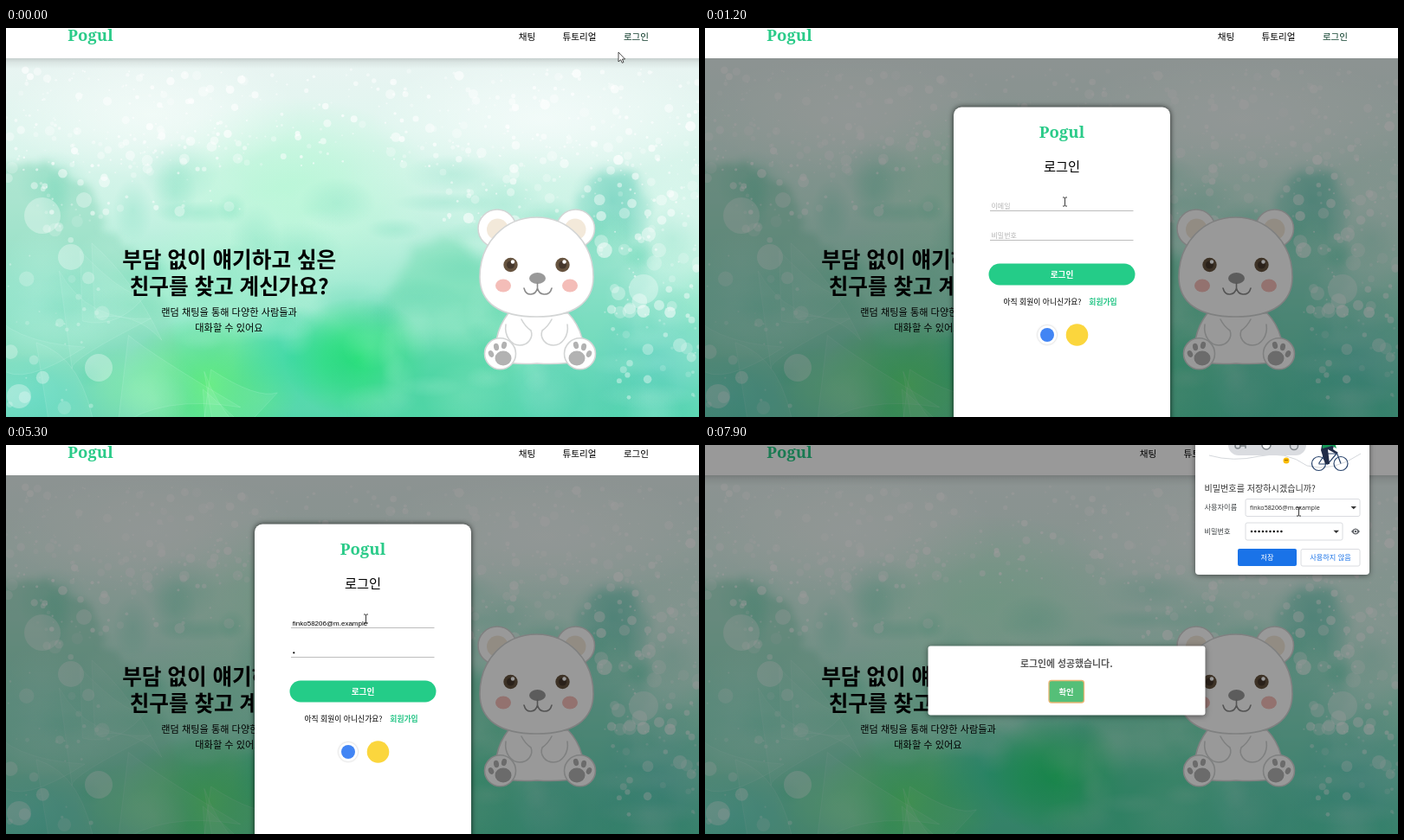
These frames come from a looping animation (800 px wide and 450 px high, 8 s). An HTML page with a canvas:

```html
<!DOCTYPE html>
<html lang="ko">
<head>
<meta charset="utf-8">
<title>로그인</title>
<style>
  html, body { margin: 0; width: 100%; height: 100%; overflow: hidden; background: #fff; }
  canvas, svg { position: absolute; left: 0; top: 0; width: 800px; height: 450px; }
  text { font-family: "Noto Sans CJK KR", "Noto Sans KR", "Noto Sans CJK JP", sans-serif; }
  .mid { text-anchor: middle; }
  .logo { font: bold 18.5px "Noto Serif", serif; fill: #2bcb89; text-anchor: middle; }
  .nav { font-size: 10.6px; text-anchor: middle; }
  .input { font: 8px "Liberation Sans", Arial, sans-serif; }
  .hint { font-size: 8px; fill: #b5b5b5; }
  .item { font: 7.75px "Open Sans", sans-serif; fill: #333; }
  .small { font-size: 8.2px; fill: #3c4043; }
  .shade { filter: drop-shadow(0 1px 3px rgba(0,0,0,.5)); }
</style>
</head>
<body>
<canvas id="paint" width="800" height="450"></canvas>
<svg viewBox="0 0 800 450" xmlns="http://www.w3.org/2000/svg">
  <defs>
    <linearGradient id="drop" x2="0" y2="1">
      <stop stop-color="#000" stop-opacity=".15"/><stop offset=".4" stop-color="#000" stop-opacity=".06"/><stop offset="1" stop-color="#000" stop-opacity="0"/>
    </linearGradient>
    <g id="foot">
      <circle cx="570.5" cy="376.8" r="18" fill="#fff" stroke="#d3d5d5" stroke-width="1.6"/>
      <g fill="#b2b2b2">
        <ellipse cx="574" cy="382" rx="9.5" ry="8.5"/>
        <ellipse cx="560" cy="377" rx="3" ry="4" transform="rotate(-25 560 377)"/>
        <ellipse cx="566" cy="369" rx="3" ry="4.2" transform="rotate(-10 566 369)"/>
        <ellipse cx="575" cy="367" rx="3" ry="4.2" transform="rotate(15 575 367)"/>
      </g>
    </g>
    <g id="side">
      <circle cx="567" cy="232" r="22" fill="#fff" stroke="#d3d5d5" stroke-width="1.6"/>
      <circle cx="567.5" cy="233" r="12.5" fill="#f3e9da"/>
    </g>
    <g id="face">
      <circle cx="582.5" cy="274" r="8.2" fill="#66533f"/>
      <circle cx="582.5" cy="274" r="4.5" fill="#45372c"/>
      <ellipse cx="574" cy="298" rx="9" ry="7.5" fill="#f4bdb8"/>
    </g>
  </defs>

  <g id="bear">
    <use href="#side"/><use href="#side" transform="matrix(-1 0 0 1 1224.5 0)"/>
    <g fill="#fff" stroke="#d3d5d5" stroke-width="1.6" stroke-linecap="round">
      <path d="M580 330C566 348 562 370 569 385Q588 390 613 388Q640 390 663 385C671 370 664 346 649 330Z"/>
      <path d="M612.500 219C649 219 678 248 678 288C678 318 655 334 612.500 334C570 334 547 318 547 288C547 248 576 219 612.500 219Z"/>
      <path d="M577 343C575 356 583 367 593 367C603 367 609 358 606 350Q599 345 595 337M648 343C650 356 642 367 632 367C622 367 616 358 619 350Q626 345 630 337" fill="none"/>
    </g>
    <use href="#face"/><use href="#face" transform="matrix(-1 0 0 1 1225 0)"/>
    <circle cx="585" cy="270.500" r="2.200" fill="#fff"/><circle cx="644.500" cy="270.500" r="2.200" fill="#fff"/>
    <ellipse cx="613.500" cy="289.500" rx="9.500" ry="6.500" fill="#999"/>
    <path d="M613.500 295V301M598 301Q600 308.500 606 308Q612 307.500 613.500 301Q615 307.500 621 308Q628 308.500 630 301" fill="none" stroke="#8b8b8b" stroke-width="1.600" stroke-linecap="round"/>
    <use href="#foot"/><use href="#foot" transform="matrix(-1 0 0 1 1233 0)"/>
  </g>

  <g class="mid">
    <g font-weight="700" font-size="24.600">
      <text x="257.700" y="276.500">부담 없이 얘기하고 싶은</text>
      <text x="257.700" y="308">친구를 찾고 계신가요?</text>
    </g>
    <g font-size="11.200">
      <text x="257.500" y="332.500">랜덤 채팅을 통해 다양한 사람들과</text>
      <text x="257.500" y="350.500">대화할 수 있어요</text>
    </g>
  </g>

  <rect id="headShade" y="35" width="800" height="12" fill="url(#drop)"/>
  <rect width="800" height="35" fill="#fff"/>
  <text class="logo" x="97.500" y="15">Pogul</text>
  <g id="guestNav" class="nav">
    <text x="601.500" y="14">채팅</text><text x="662" y="14">튜토리얼</text>
    <text id="loginLink" x="727.500" y="14">로그인</text>
  </g>
  <g id="userNav" class="nav">
    <text x="511.500" y="14">채팅</text><text x="572" y="14">튜토리얼</text>
    <text x="642" y="14">로그아웃</text><text x="718" y="14">마이페이지</text>
  </g>

  <g id="login">
    <rect y="35" width="800" height="415" opacity=".4"/>
    <rect x="287" y="91.500" width="250" height="400" rx="9" fill="#fff" style="filter:drop-shadow(0 0 3px rgba(0,0,0,.75))"/>
    <text class="logo" x="412" y="127">Pogul</text>
    <text class="mid" x="412" y="166" font-size="15.300">로그인</text>
    <path d="M329 211.500H494.500M329 245.500H494.500" stroke="#bdbdbd"/>
    <text id="mailHint" class="hint" x="330.500" y="208.700">이메일</text>
    <text id="passHint" class="hint" x="330.500" y="243">비밀번호</text>
    <text id="mail" class="input" x="330.800" y="208.700"></text>
    <g id="pass"></g>
    <rect id="caret" width=".8" height="9"/>
    <rect id="submit" x="327.500" y="272.500" width="169" height="25" rx="12.500"/>
    <text class="mid" x="412" y="288.500" font-size="9.700" font-weight="700" fill="#fff">로그인</text>
    <text class="mid" x="389.500" y="320.300" font-size="8.800">아직 회원이 아니신가요?</text>
    <text class="mid" x="459.500" y="320.300" font-size="8.800" font-weight="700" fill="#24c586">회원가입</text>
    <circle cx="395" cy="355" r="11" fill="#fff" style="filter:drop-shadow(0 0 1px rgba(0,0,0,.25))"/>
    <circle cx="395" cy="355" r="8" fill="#4285f4"/>
    <circle cx="429.500" cy="355" r="12.800" fill="#fbd63d"/>
    <g id="menu">
      <rect id="menuBox" x="329" y="212" width="165.500" rx="2" fill="#fff" style="filter:drop-shadow(0 .5px 1.2px rgba(0,0,0,.45))"/>
      <g id="menuItems"></g>
    </g>
  </g>

  <rect id="alertDim" width="800" height="450" opacity=".4"/>
  <g id="alert">
    <rect class="shade" x="257.500" y="232.500" width="320" height="80" rx="3" fill="#fff"/>
    <text class="mid" x="417.300" y="257" font-size="10.900" font-weight="700" fill="#595959">로그인에 성공했습니다.</text>
    <rect id="ok" x="397" y="272.500" width="40.500" height="25.500" rx="3" stroke="#e9b674" stroke-width="1.300"/>
    <text class="mid" x="417" y="288.800" font-size="9.300" font-weight="700" fill="#fff">확인</text>
  </g>

  <g id="bubble">
    <rect class="shade" x="566" y="-20" width="201" height="170" rx="4" fill="#fff"/>
    <path d="M582 12Q610 20 640 13T695 24Q725 32 757 10" fill="none" stroke="#d5d8dc"/>
    <rect x="604" y="-12" width="90" height="24" rx="12" fill="#dadce0"/>
    <g fill="none" stroke="#80868b" stroke-width="1.500">
      <circle cx="615" cy="1" r="3"/><path d="M618 1H624V4"/><circle cx="648" cy="0" r="5" fill="#fff"/><circle cx="680" cy="1" r="4.500"/>
    </g>
    <circle cx="671" cy="18" r="3.500" fill="#fbbc04"/><path d="M669 17.500H673" stroke="#a66b00"/>
    <g fill="none" stroke="#28436b" stroke-width="1.200">
      <circle cx="708.500" cy="21.500" r="8"/><circle cx="734" cy="21.500" r="8"/>
      <path d="M708.500 21.500L716 10H729L719 22L716 10M729 8L734 21.500M719 22H708.500"/>
    </g>
    <path d="M713 -5L727 -4L725 5L731 9L728 10L719 5L721 22L716 22L711 6Z" fill="#202c48"/>
    <path d="M712 -6H726L729 4L724 1L713 4Z" fill="#159957"/>
    <text x="576.500" y="53.800" font-size="10.100" fill="#333">비밀번호를 저장하시겠습니까?</text>
    <text class="small" x="576.500" y="75.200">사용자이름</text>
    <text class="small" x="576.500" y="103">비밀번호</text>
    <g fill="#fff" stroke="#dadce0">
      <rect x="624" y="62.500" width="132" height="20" rx="2"/><rect x="624" y="90" width="112" height="20" rx="2"/>
      <rect x="688" y="120.500" width="68" height="19.500" rx="2"/>
    </g>
    <text id="savedMail" x="629" y="75" style="font:7.200px 'Open Sans',sans-serif" fill="#222"></text>
    <g id="savedDots"></g>
    <path d="M745.500 71H752L748.750 74.200ZM725.500 98.800H732L728.750 102Z" fill="#333"/>
    <path d="M746 100Q751 93 756 100Q751 107 746 100Z" fill="#5f6368"/>
    <circle cx="751" cy="100" r="2.200" fill="#fff"/><circle cx="751" cy="100" r="1.300" fill="#5f6368"/>
    <rect x="615" y="120" width="68" height="20" rx="2" fill="#1a73e8"/>
    <text class="mid" x="649" y="133" font-size="8.200" fill="#fff">저장</text>
    <text class="mid" x="722" y="133" font-size="8.200" fill="#1a73e8">사용하지 않음</text>
  </g>

  <g id="pointer" stroke-linejoin="round">
    <path id="arrow" d="M0 0V11L2.600 8.700L4.300 12.300L6 11.500L4.400 8H7.600Z" fill="#fff" stroke="#222" stroke-width=".8"/>
    <path id="hand" d="M-1.200 1Q0 -1 1.300 1V5.500Q2.800 4.800 3.600 6Q5 5.500 5.700 6.700Q7.300 6.500 7.300 8V11L6 14.500H-1.500L-4.500 9.500Q-5 7.500 -3 8L-1.200 9.500Z" fill="#fff" stroke="#222" stroke-width=".9"/>
    <path id="beam" d="M-2.500 -5H-.6L0 -4.500L.6 -5H2.500M0 -4.500V4.500M-2.500 5H-.6L0 4.500L.6 5H2.500" fill="none" stroke="#222" stroke-width=".9"/>
  </g>
</svg>

<script>
const $ = id => document.getElementById(id);
const clamp = v => Math.max(0, Math.min(1, v));
const show = (id, on) => $(id).style.display = on ? '' : 'none';

// Watercolour backdrop
function paintBackdrop() {
  const c = $('paint').getContext('2d');
  let seed = 11;
  const rnd = () => (seed = seed * 16807 % 2147483647) / 2147483647;
  const range = (a, b) => a + rnd() * (b - a);

  const base = c.createLinearGradient(0, 35, 0, 450);
  ['#e9f4f2', '#e0f6ef', '#cdf3e6', '#a9ecd5', '#80e3c2', '#5cd9b2']
    .forEach((color, i, all) => base.addColorStop(i / (all.length - 1), color));
  c.fillStyle = base;
  c.fillRect(0, 0, 800, 450);

  const glow = (color, x, y, rx, ry, alpha) => {
    c.save();
    c.translate(x, y);
    c.scale(rx, ry);
    const g = c.createRadialGradient(0, 0, 0, 0, 0, 1);
    g.addColorStop(0, color);
    g.addColorStop(.45, color + 'a0');
    g.addColorStop(1, color + '00');
    c.globalAlpha = alpha;
    c.fillStyle = g;
    c.fillRect(-1, -1, 2, 2);
    c.restore();
  };
  // A ragged wash: the outline is jittered along straight sides, then softened.
  const wash = (color, alpha, blur, ...p) => {
    c.save();
    c.filter = `blur(${blur}px)`;
    c.globalAlpha = alpha;
    c.fillStyle = color;
    c.beginPath();
    for (let i = 0; i < p.length; i += 2) {
      const nx = p[(i + 2) % p.length], ny = p[(i + 3) % p.length];
      for (let k = 0; k < 6; k++)
        c.lineTo(p[i] + (nx - p[i]) * k / 6 + range(-6, 6), p[i + 1] + (ny - p[i + 1]) * k / 6 + range(-6, 6));
    }
    c.fill();
    c.restore();
  };

  wash('#86d6b8', .5, 4, -20, 162, 50, 155, 105, 190, 115, 240, 170, 270, 220, 470, -20, 470);
  wash('#5fcfb4', .4, 5, 640, 270, 660, 195, 685, 165, 730, 170, 745, 215, 740, 290, 690, 470, 600, 470);
  wash('#4fd09a', .35, 7, 400, 470, 435, 320, 470, 255, 520, 238, 570, 290, 600, 470);
  wash('#3fce98', .25, 10, 190, 470, 235, 370, 320, 330, 400, 370, 420, 470);
  glow('#b7f7d6', 330, 190, 170, 110, .9);
  glow('#b6f7d6', 240, 300, 140, 70, .6);
  glow('#a0ebd8', 40, 320, 120, 80, .55);
  glow('#62ec7c', 235, 413, 105, 80, .95);
  glow('#2ad6a0', 330, 380, 70, 60, .6);
  glow('#1fdf72', 405, 382, 85, 70, .95);
  glow('#3fd29c', 490, 410, 90, 65, .6);
  glow('#5cd9c6', 25, 430, 95, 55, .7);
  glow('#84edaa', 150, 415, 70, 50, .6);
  glow('#58d2b4', 650, 430, 130, 60, .55);
  glow('#6ccdbd', 700, 200, 50, 50, .5);
  glow('#62cdc4', 755, 390, 85, 80, .65);
  glow('#e0f8f0', 775, 225, 60, 80, .8);
  glow('#bdeee4', 750, 310, 60, 50, .5);
  glow('#d0f5e8', 590, 200, 110, 70, .6);
  glow('#f6fcfa', 170, 100, 170, 75, .75);
  glow('#f6fcfb', 620, 105, 200, 75, .8);

  // Uneven pigment, stronger towards the bottom
  for (let i = 0; i < 110; i++)
    glow(i % 2 ? '#d2f8e8' : '#35c79c', range(0, 800), 450 - 290 * rnd(), range(15, 60), range(12, 45), .16);

  // Faint folded sheets
  for (let i = 0; i < 9; i++) {
    const x = range(-30, 240), y = range(240, 420);
    c.beginPath();
    c.moveTo(x, y);
    c.quadraticCurveTo(x + range(20, 70), y + range(10, 80), x + range(50, 160), y + range(10, 120));
    c.quadraticCurveTo(x + range(10, 60), y + range(60, 110), x + range(-40, 30), y + range(60, 130));
    c.closePath();
    c.fillStyle = 'rgba(220,255,240,.07)';
    c.fill();
    c.strokeStyle = 'rgba(240,255,250,.13)';
    c.stroke();
  }

  const dot = (x, y, r, alpha) => {
    c.fillStyle = `rgba(255,255,255,${alpha})`;
    c.beginPath();
    c.arc(x, y, r, 0, 7);
    c.fill();
  };
  const scatter = (n, x0, x1, y0, y1, r, alpha) => {
    for (let i = 0; i < n; i++)
      dot(range(x0, x1), range(y0, y1), 1 + r * rnd() ** 3, alpha * range(.35, 1));
  };
  scatter(420, 0, 800, 48, 160, 5, .7);
  scatter(80, 0, 270, 120, 215, 6, .55);
  scatter(110, 500, 800, 130, 225, 6, .6);
  scatter(45, 0, 125, 200, 445, 8, .35);
  scatter(70, 685, 800, 180, 340, 8, .55);
  scatter(30, 690, 800, 320, 430, 7, .4);
  for (const [x, y, r] of [[75, 265, 15], [107, 393, 16], [42, 217, 21], [15, 426, 14], [736, 302, 17], [707, 307, 8], [90, 199, 9], [778, 367, 8]])
    dot(x, y, r, .32);
}

const MAIL = 'finko58206@m.example';
const keyTimes = [1500, 1700, 1800, 2000, 2100, 2300, 2400, 2500, 2600, 2700,
  2900, 3100, 3400, 3600, 4000, 4200, 4300, 4500, 4500, 4500];
const dotTimes = [5000, 5400, 5500, 5600, 5600, 5800, 5900, 6000, 6100];
const user = MAIL.slice(0, 10), host = MAIL.slice(10);
const allItems = [user, user + '6' + host, MAIL, user + '8' + host, MAIL + 'a'];
const fewItems = [MAIL, MAIL + 'a'];
const dots = (n, x, y, step, r) =>
  Array.from({length: n}, (_, i) => `<circle cx="${x + i * step}" cy="${y}" r="${r}"/>`).join('');

// time, x, y, shape from that time on
const path = [
  [0, 707, 28, 'arrow'], [100, 722, 17, 'hand'], [200, 727, 12, 'hand'], [400, 727, 12, 'hand'],
  [600, 545.5, 112, 'hand'], [700, 500, 150, 'arrow'], [900, 440, 190, 'arrow'], [1100, 415.5, 201, 'beam'],
  [6200, 415.5, 201, 'beam'], [6300, 414, 222, 'arrow'], [6500, 411, 275, 'hand'], [6700, 411, 283, 'hand'],
  [7000, 411, 283, 'hand'], [7100, 415, 285, 'hand'], [7300, 420, 285, 'hand'], [7400, 450, 284, 'arrow'],
  [7700, 578, 270, 'arrow'], [7800, 655, 130, 'beam'], [7900, 685.5, 77, 'beam'], [8000, 685.5, 77, 'beam']];

function movePointer(t) {
  const i = path.findIndex((p, k) => t >= p[0] && t < path[k + 1][0]);
  const [a, b] = [path[i], path[i + 1]];
  const u = (t - a[0]) / (b[0] - a[0]);
  $('pointer').setAttribute('transform', `translate(${a[1] + (b[1] - a[1]) * u} ${a[2] + (b[2] - a[2]) * u})`);
  for (const shape of ['arrow', 'hand', 'beam']) show(shape, shape === a[3]);
}

function typeFields(t) {
  const cleared = t >= 6700;
  const typed = cleared ? 0 : keyTimes.filter(k => k <= t).length;
  const hidden = cleared ? 0 : dotTimes.filter(k => k <= t).length;
  $('mail').textContent = MAIL.slice(0, typed);
  $('pass').innerHTML = dots(hidden, 332.3, 240.3, 2.6, 1.1);
  show('mailHint', t < 1300 || cleared);
  show('passHint', t < 5000 || cleared);

  const inPass = t >= 4700;
  const since = t - Math.max(1300, ...keyTimes.concat(4700, dotTimes).filter(k => k <= t));
  show('caret', t >= 1300 && t < 6200 && since < 200);
  $('caret').setAttribute('x', inPass ? 331 + hidden * 2.6 : 330.8 + (typed && $('mail').getComputedTextLength()));
  $('caret').setAttribute('y', inPass ? 235.5 : 201.5);

  show('menu', t >= 1700 && t < 4700);
  const items = t < 2900 ? allItems : fewItems;
  $('menuBox').setAttribute('height', 11 + items.length * 22.5);
  $('menuItems').innerHTML = items.map((s, i) =>
    `<text class="item" x="337" y="${231.8 + i * 22.5}">${s}</text>`).join('');
}

// Pop-in: overshoot, dip, settle
function popScale(ms) {
  const stops = [[0, .7], [135, 1.05], [240, .95], [300, 1]];
  const i = stops.findIndex(s => s[0] > ms);
  if (i < 1) return i ? 1 : .7;
  const [[t0, a], [t1, b]] = [stops[i - 1], stops[i]];
  const u = (ms - t0) / (t1 - t0);
  return a + (b - a) * (1 - (1 - u) ** 2);
}
const scaleAt = (s, x, y) => `translate(${x} ${y}) scale(${s}) translate(${-x} ${-y})`;

function draw(t) {
  const signedIn = t >= 7000;
  const fade = signedIn ? 0 : clamp((t - 300) / 390);
  $('login').style.opacity = fade;
  $('headShade').style.opacity = 1 - fade;
  show('guestNav', !signedIn);
  show('userNav', signedIn);
  const green = t < 900 ? clamp(.3 + t / 250) : clamp((1300 - t) / 300);
  $('loginLink').setAttribute('fill', `rgb(${26 * green},${178 * green},${120 * green})`);
  $('submit').setAttribute('fill', t >= 6500 ? '#25e695' : '#24cc88');

  show('alertDim', signedIn);
  show('alert', signedIn);
  $('alert').setAttribute('transform', scaleAt(popScale(t - 6988), 417.5, 272.5));
  $('ok').setAttribute('fill', t < 7400 ? '#2fa259' : '#55bf78');

  const open = clamp((t - 7020) / 107);
  show('bubble', open > 0);
  $('bubble').style.opacity = open;
  $('bubble').setAttribute('transform', scaleAt(.86 + .14 * open, 666.5, 65));

  typeFields(t);
  movePointer(t);
}

paintBackdrop();
$('savedMail').textContent = MAIL;
$('savedDots').innerHTML = dots(9, 631, 100, 4.3, 1.2);
const start = performance.now();
function tick() {
  draw(Math.floor((performance.now() - start) % 8000 / 100) * 100);
  requestAnimationFrame(tick);
}
tick();
</script>
</body>
</html>
```
